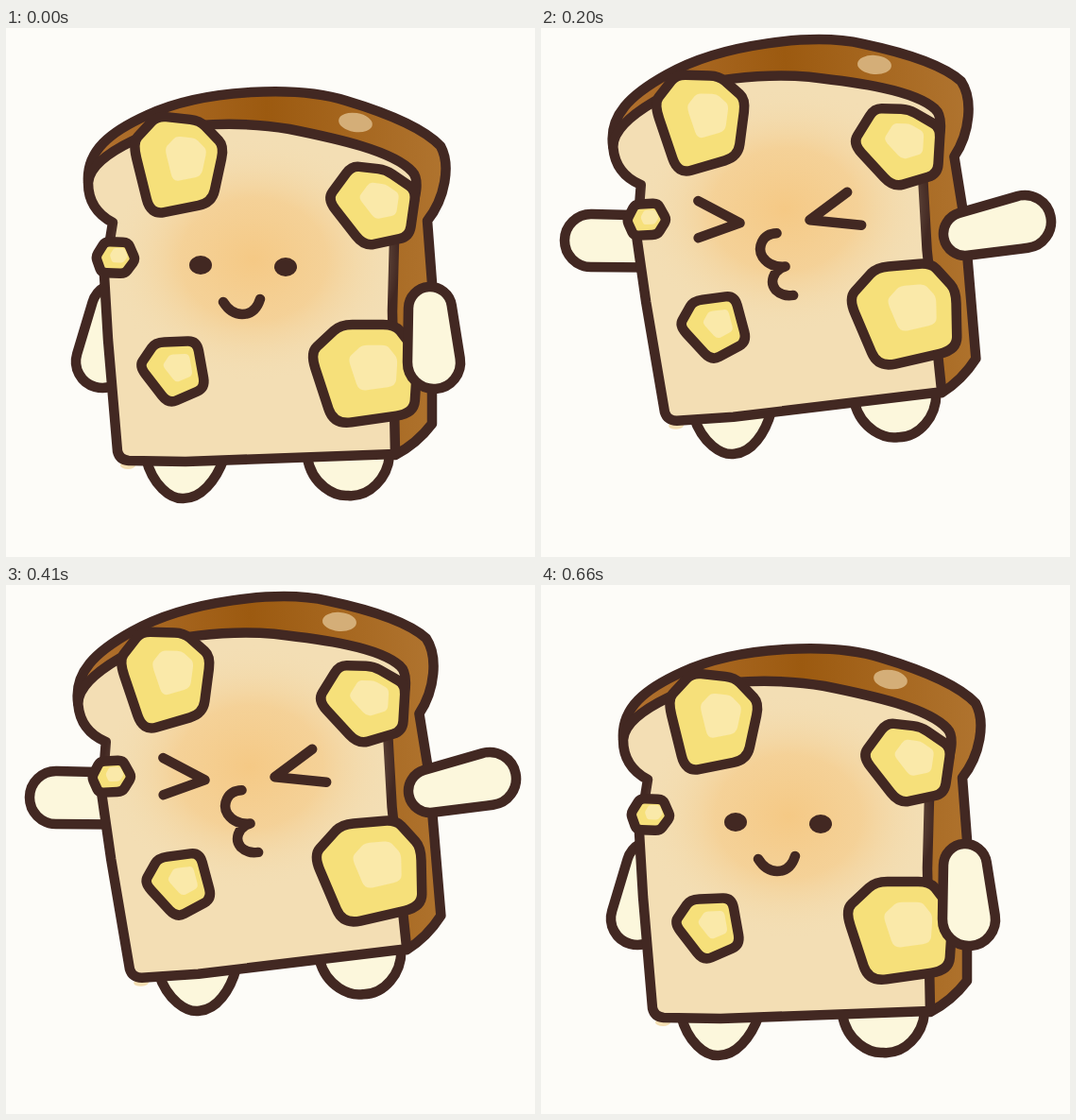
Recreate the animation shown at these times as an HTML page. Size 560x560 px, loop 0.83 s.

```html
<!DOCTYPE html>
<html lang="en">
<head>
<meta charset="utf-8">
<title>Jumping toast</title>
<style>
  html, body { margin: 0; height: 100%; overflow: hidden; background: #fdfcf8; }
  svg { display: block; width: 100vw; height: 100vh; }
  .line { fill: none; stroke: #422822; stroke-width: 10.5; stroke-linecap: round; stroke-linejoin: round; }
  .limb { fill: #fcf7dc; }
  .butter { fill: #f6e07a; }
  .shine { fill: #fae9a9; }
</style>
</head>
<body>
<svg viewBox="0 0 560 560">
  <defs>
    <linearGradient id="crust">
      <stop offset="0" stop-color="#b27230"/>
      <stop offset=".5" stop-color="#9c5a10"/>
      <stop offset="1" stop-color="#b0742f"/>
    </linearGradient>
    <radialGradient id="glow">
      <stop offset="0" stop-color="#f5c985"/>
      <stop offset=".5" stop-color="#f5cd8e" stop-opacity=".75"/>
      <stop offset="1" stop-color="#f3deb4" stop-opacity="0"/>
    </radialGradient>
  </defs>

  <g id="feet" class="line limb">
    <path d="M148 455C155 484 174 499 188 498C206 498 222 480 231 455"/>
    <path d="M319 455C324 484 348 496 362 495C385 497 404 476 406 453"/>
  </g>
  <path id="left" class="line limb"/>

  <g id="body">
    <ellipse cx="129" cy="463" rx="8" ry="4" fill="#f4dfb3"/>
    <path class="line" style="fill: url(#crust)" d="M87 163C85 130 110 110 150 92C210 64 310 61 360 77C400 89 442 106 460 125C471 145 465 180 446 204L451 270V419Q435 440 412 452L250 300Z"/>
    <ellipse cx="370" cy="100" rx="18" ry="10" transform="rotate(9 370 100)" fill="#d4ae78"/>
    <path class="line" style="fill: #f3deb4" d="M87 164C88 145 112 130 135 119C180 97 260 100 300 107C350 117 410 130 430 152C438 160 434 180 428 195L411 225L409 300L412 451L190 459L130 458Q120 457 118 448L108 330L104 262L113 206C98 198 87 185 87 164Z"/>
    <ellipse cx="262" cy="245" rx="155" ry="130" fill="url(#glow)"/>
    <g id="smile">
      <g fill="#422822">
        <ellipse cx="206" cy="251" rx="12" ry="10"/>
        <ellipse cx="296" cy="253" rx="12" ry="10"/>
      </g>
      <path class="line" d="M230 290Q238 303 250 303Q264 303 269 287"/>
    </g>
    <path id="squint" class="line" d="M172 228L214 255L169 267M330 232L288 258L342 268M252 269C236 268 230 283 235 293Q242 305 258 305C244 308 240 321 246 329Q253 337 264 336"/>
    <g id="butters"></g>
  </g>

  <g id="splat">
    <path class="line butter" d="M69 238L103 233L138 236A8 9 0 0 1 138 254A8 9 0 0 1 137 274A8 9 0 0 1 128 293L72 297Q66 282 66 265Z"/>
    <circle class="shine" cx="105" cy="260" r="14"/>
  </g>
  <path id="right" class="line limb"/>
</svg>

<script>
const $ = id => document.getElementById(id);

// Closed polygon with softened corners.
function blob(corners) {
  const n = corners.length;
  const toward = (i, j) => corners[i].map((v, k) => v + (corners[j][k] - v) * .22);
  return "M" + corners.map((c, i) =>
    `${toward(i, (i + n - 1) % n)}Q${c} ${toward(i, (i + 1) % n)}`).join("L") + "Z";
}

// A shine is the outline shrunk around a spot up and right of the middle.
function butter(text) {
  const corners = text.split(" ").map(s => s.split(",").map(Number));
  const spot = [.65, .38].map((f, k) => {
    const side = corners.map(c => c[k]), low = Math.min(...side);
    return low + f * (Math.max(...side) - low);
  });
  const inner = corners.map(c => c.map((v, k) => spot[k] + (v - spot[k]) * .46));
  return `<path class="line butter" d="${blob(corners)}"/><path class="shine" d="${blob(inner)}"/>`;
}

$("butters").innerHTML = [
  "134,121 160,93 205,98 231,125 218,185 153,198",
  "340,181 366,146 402,150 434,172 427,221 379,231",
  "322,344 354,314 412,314 436,345 432,408 347,420",
  "141,358 158,333 202,331 211,381 172,398",
  "95,242 105,226 129,227 137,245 126,260 101,259"
].map(butter).join("");

// Outline wrapped around a shoulder circle and a hand circle.
function arm(r0, x0, y0, x1, y1) {
  const r1 = 28, a = Math.atan2(y1 - y0, x1 - x0);
  const b = Math.acos((r0 - r1) / Math.hypot(x1 - x0, y1 - y0));
  const rim = (x, y, r, t) => `${x + r * Math.cos(t)} ${y + r * Math.sin(t)}`;
  return `M${rim(x0, y0, r0, a + b)}L${rim(x1, y1, r1, a + b)}` +
    `A${r1} ${r1} 0 1 0 ${rim(x1, y1, r1, a - b)}` +
    `L${rim(x0, y0, r0, a - b)}A${r0} ${r0} 0 0 0 ${rim(x0, y0, r0, a + b)}Z`;
}

// Body shift, turn and stretch; each arm from shoulder to hand.
const rest   = { dx: 0, dy: 0, turn: 0, tall: 1, left: [118, 298, 102, 353], right: [449, 297, 453, 354] };
const squash = { ...rest, tall: .931, left: [118, 309, 87, 350], right: [450, 311, 477, 354] };
const spring = { ...rest, dy: -16, tall: 1.053, left: [115, 258, 57, 286], right: [450, 266, 503, 314] };
const peak   = { dx: -2, dy: -60, turn: -4.8, tall: 1, left: [115, 195, 64, 186], right: [447, 212, 504, 177] };
const glide  = { ...peak, dy: -53, left: [115, 226, 53, 225], right: [449, 218, 512, 205] };

const steps = [
  [0, rest], [80, squash], [160, spring], [200, glide], [290, peak],
  [370, peak], [410, glide], [500, spring], [540, squash], [660, rest]
];

const show = (id, on) => $(id).setAttribute("visibility", on ? "visible" : "hidden");
const within = (t, from, to) => t >= from && t < to;
const begin = performance.now();

function draw(now) {
  const t = Math.max(0, now - begin) % 830;
  const { dx, dy, turn, tall, left, right } = steps.findLast(s => s[0] <= t)[1];
  const stance = `translate(${dx} ${dy}) rotate(${turn} 266 275)`;
  $("feet").setAttribute("transform", stance);
  $("body").setAttribute("transform", `${stance} translate(0 ${460 * (1 - tall)}) scale(1 ${tall})`);
  $("left").setAttribute("d", arm(27.5, ...left));
  $("right").setAttribute("d", arm(23, ...right));
  const squinting = within(t, 200, 660);
  show("smile", !squinting);
  show("squint", squinting);
  show("splat", within(t, 290, 370));
  requestAnimationFrame(draw);
}
draw(begin);
</script>
</body>
</html>
```
